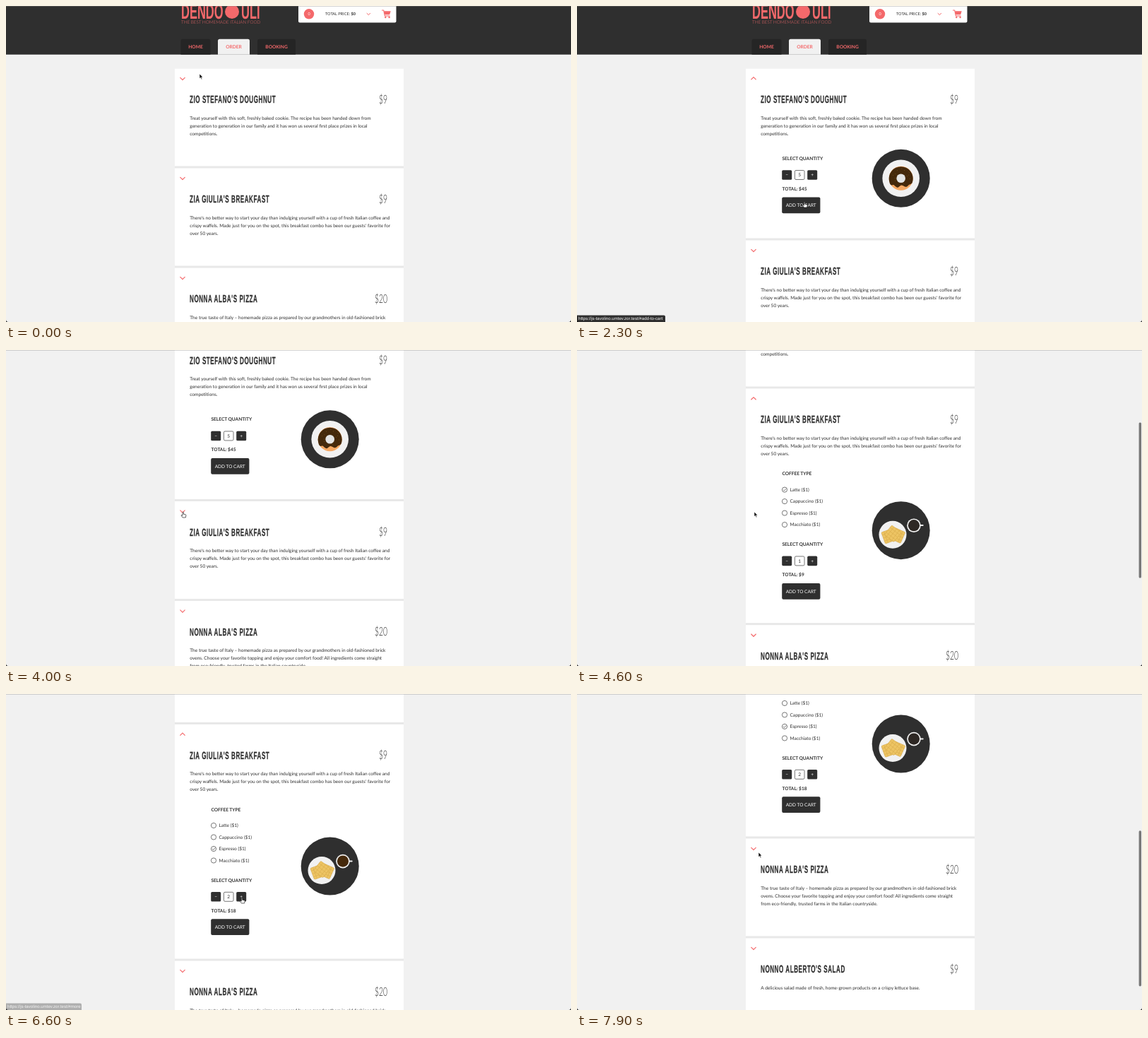
An HTML page that plays this animation: 800 px wide and 447 px high, repeating every 8000 ms.

```html
<!DOCTYPE html>
<html lang="en">
<head>
<meta charset="utf-8">
<title>Order page</title>
<style>
  html, body { margin: 0; width: 100%; height: 100%; overflow: hidden; background: #f1f1f1; }
  svg { display: block; width: 100vw; height: 100vh; }
  text { font: 6.55px Lato, sans-serif; fill: #2f2f2f; text-rendering: geometricPrecision; white-space: pre; }
  .b { font-weight: 700; }
  .title { font: 700 14.7px "Liberation Sans", sans-serif; letter-spacing: 1px; stroke: #2f2f2f; stroke-width: .3; }
  .price { font: 300 17px Lato, sans-serif; }
  .logo { font: 700 30px "Liberation Sans", sans-serif; fill: #f4696b; }
  .tag { font-size: 6.34px; font-weight: 300; fill: #f4696b; }
  .nav { font-size: 6.6px; font-weight: 700; fill: #f4696b; }
  .cart { font-size: 5.6px; }
  .url { font: 6.08px "Liberation Sans", sans-serif; fill: #fff; }
  .mid { text-anchor: middle; }
  .w { fill: #fff; }
  .line { fill: none; stroke: #f4696b; stroke-width: 1.2; stroke-linecap: round; stroke-linejoin: round; }
  .thin { fill: none; stroke: #2f2f2f; stroke-width: .65; }
</style>
</head>
<body>
<svg id="stage" viewBox="0 0 800 447" preserveAspectRatio="none"></svg>
<script>
const LOOP = 8000, DARK = '#2f2f2f', CORAL = '#f4696b', PALE = '#f1f1f1', TAB = '#252525';
const CARD = { top: 88.5, height: 138, gap: 3 };
const EXTRA = [102, 193.5];
const PAGE = { height: 714, offset: 33, view: 447 };
const SITE = 'https:\/\/js-tavolino.umtev.zor.test/#';

const dishes = [
  ["ZIO STEFANO'S DOUGHNUT", '$9', [
    'Treat yourself with this soft, freshly baked cookie. The recipe has been handed down from',
    'generation to generation in our family and it has won us several first place prizes in local',
    'competitions.']],
  ["ZIA GIULIA'S BREAKFAST", '$9', [
    "There's no better way to start your day than indulging yourself with a cup of fresh Italian coffee and",
    "crispy waffels. Made just for you on the spot, this breakfast combo has been our guests' favorite for",
    'over 50 years.']],
  ["NONNA ALBA'S PIZZA", '$20', [
    'The true taste of Italy – homemade pizza as prepared by our grandmothers in old-fashioned brick',
    'ovens. Choose your favorite topping and enjoy your comfort food! All ingredients come straight',
    'from eco-friendly, trusted farms in the Italian countryside.']],
  ["NONNO ALBERTO'S SALAD", '$9', [
    'A delicious salad made of fresh, home-grown products on a crispy lettuce base.']]
];
const coffees = ['Latte', 'Cappuccino', 'Espresso', 'Macchiato'];

// Markup helpers
const text = (x, y, s, cls = '', more = '') => `<text x="${x}" y="${y}" class="${cls}" ${more}>${s}</text>`;
const narrow = (x, y, k, s, cls, more = '') =>
  `<text transform="translate(${x} ${y}) scale(${k} 1)" class="${cls}" ${more}>${s}</text>`;
const rect = (x, y, w, h, fill, r = 0, more = '') =>
  `<rect x="${x}" y="${y}" width="${w}" height="${h}" rx="${r}" fill="${fill}" ${more}/>`;
const circle = (x, y, r, fill, more = '') => `<circle cx="${x}" cy="${y}" r="${r}" fill="${fill}" ${more}/>`;
const path = (d, cls = '', more = '') => `<path d="${d}" class="${cls}" ${more}/>`;

function header() {
  const tab = (x, w, s, fill) => rect(x, 46.8, w, 25, fill, 2.5) + text(x + w / 2, 60, s, 'nav mid');
  return rect(0, -60, 800, 128.7, DARK)
    + narrow(248, 18, .55, 'DENDO', 'logo') + circle(320, 8, 10, CORAL) + narrow(333, 18, .55, 'ULI', 'logo')
    + text(248, 24.8, 'THE BEST HOMEMADE ITALIAN FOOD', 'tag')
    + '<svg x="0" y="0" width="800" height="68.7">'
    + tab(247.5, 42, 'HOME', TAB) + tab(300, 45, 'ORDER', PALE) + tab(356, 54, 'BOOKING', TAB)
    + '</svg>'
    + rect(414, -20, 138.5, 43.5, '#fff', 2)
    + circle(429, 11.3, 7.2, CORAL) + text(429, 13.3, '0', 'cart mid w')
    + text(452, 13.2, 'TOTAL PRICE: <tspan class="b">$0</tspan>', 'cart')
    + path('M511 10.4l2.3 2.2 2.3-2.2', 'line', 'style="stroke-width:1"')
    + path('M532.5 6h2.2l1.7 8h6.8', 'line')
    + path('M535.3 7.2h9.4l-1.5 5h-6.8z', '', `fill="${CORAL}"`)
    + circle(537.3, 16, 1.2, CORAL) + circle(542.6, 16, 1.2, CORAL);
}

function form(y, id) {
  const key = (x, s) => rect(x, y + 16.7, 14, 13.6, DARK, 1.6) + text(x + 7, y + 25.7, s, 'mid w');
  return text(290.5, y + 2.4, 'SELECT QUANTITY', 'b')
    + key(290.2, '−') + key(326.2, '+')
    + rect(308.4, y + 17, 13.6, 13, '#fff', 1.6, `stroke="${DARK}" stroke-width=".65"`)
    + text(315.2, y + 25.9, '1', 'mid', `id="qty${id}"`)
    + text(290.5, y + 45.2, 'TOTAL: $9', 'b', `id="sum${id}"`)
    + rect(290.2, y + 55, 54.2, 22.8, DARK, 2) + text(317.2, y + 68.7, 'ADD TO CART', 'mid w');
}

function doughnut() {
  const dots = Array.from({ length: 14 }, (_, i) => {
    const a = i * 2.4, r = 9 + i % 3 * 2.3;
    return circle((r * Math.cos(a)).toFixed(1), (-3 + r * .8 * Math.sin(a)).toFixed(1), .5, '#7a5520');
  }).join('');
  return '<g transform="translate(458.7 155.3)">'
    + circle(0, 0, 41, DARK) + circle(0, 0, 26.3, PALE) + circle(0, 0, 17, '#f5a863')
    + path('M-16.6 4A17 17 0 1 1 16.6 4C16 9 12.5 8 11 9.5S8 13 5 11.5 1 9 -1 10.5 -4 14 -7 12 -9.5 8.5 -12 9.5 -16 8 -16.6 4Z', 'cocoa')
    + dots + circle(0, 0, 6.3, '#e4e4e4') + '</g>';
}

function breakfast() {
  const grid = [-4.5, 0, 4.5].map(v => `M${v} -8.5v17M-8.5 ${v}h17`).join('');
  const waffle = (x, y, a) => `<g transform="translate(${x} ${y}) rotate(${a})">`
    + rect(-8.5, -8.5, 17, 17, '#edc463', 1.5, 'stroke="#d3a544" stroke-width=".5"')
    + path(grid, '', 'stroke="#d9ad4d" stroke-width=".6"') + '</g>';
  return '<g transform="translate(458.7 200.6)">'
    + circle(0, 0, 41, DARK) + circle(-11.7, 6, 19.5, PALE)
    + waffle(-17, 8, -20) + waffle(-5, 7, 24) + waffle(-11.5, 4.5, 38)
    + rect(26, -8.1, 6, 2, PALE, 1) + circle(18.3, -7, 9.8, PALE)
    + '<circle cx="18.3" cy="-7" r="8.1" class="cocoa"/></g>';
}

function coffeeList() {
  return text(290.5, 122.9, 'COFFEE TYPE', 'b') + coffees.map((name, i) => {
    const y = 143 + i * 16.5;
    return `<circle cx="294" cy="${y}" r="3.6" class="thin"/>`
      + path(`M292 ${y}l1.5 1.5 2.8-3`, 'thin tick') + text(301.5, y + 2.3, name + ' ($1)');
  }).join('');
}

function card([title, price, lines], i) {
  const more = [
    () => form(127, 0) + doughnut(),
    () => coffeeList() + form(220.3, 1) + breakfast()
  ][i];
  return `<g class="card">${rect(239, 0, 324, CARD.height + 3, '#e8e8e8', 0, 'class="edge"')}`
    + rect(239, 0, 324, CARD.height, '#fff', 0, 'class="face"')
    + path('', 'line arrow')
    + narrow(260, 48.8, .55, title, 'title')
    + narrow(540, 49.3, .61, price, 'price', 'text-anchor="end"')
    + lines.map((s, n) => text(260.3, 72.2 + n * 11, s)).join('')
    + (more ? `<g class="more">${more()}</g>` : '') + '</g>';
}

const stage = document.getElementById('stage');
stage.innerHTML = rect(0, 0, 800, 447, PALE)
  + `<g id="page">${header()}${dishes.map(card).join('')}</g>`
  + rect(795.6, 0, 3.4, 100, '#777', 1.7, 'id="thumb"')
  + `<g id="status">${path('', '', `id="plate" fill="${DARK}"`)}${text(2, 444.4, '', 'url', 'id="url"')}</g>`
  + rect(0, 0, 800, 1, '#888', 0, 'opacity=".35"')
  + path('M0 443.5A3.5 3.5 0 0 0 3.5 447H0ZM800 443.5A3.5 3.5 0 0 1 796.5 447H800Z', '', 'fill="#111"')
  + '<g id="cursor" stroke-width=".6" stroke-linejoin="round">'
  + path('M0 0V6.6L1.6 5.2 2.7 7.7 3.8 7.2 2.7 4.8H4.8Z', '', 'id="pointer" fill="#000" stroke="#fff"')
  + path('M-.7 .6Q0-.4.7.6V3.2L3.4 3.7Q4.3 4 4.2 5L3.6 8H-.6L-2.6 5.2Q-2.6 4.2-1.6 4.6L-.7 5.3Z', '', 'id="hand" fill="#fff" stroke="#000"')
  + '</g>';

const get = id => document.getElementById(id);
const all = sel => [...stage.querySelectorAll(sel)];
const cards = all('.card'), ticks = all('.tick'), cocoa = all('.cocoa');

// Timeline: [time, values...]
const scrollKeys = [[2700, 0], [2900, 45], [3000, 78], [3100, 101], [3400, 117.5], [4150, 117.5],
  [4450, 162], [4600, 174.8], [4720, 186.5], [7250, 186.5], [7500, 275], [7700, 335], [7880, 359.5]];
const cursorKeys = [[100, 274, 96], [400, 250, 101], [620, 250, 101], [900, 333, 238], [2080, 333, 238],
  [2260, 322, 277], [2400, 322, 277], [2700, 241, 297], [3450, 241, 297], [3850, 250.7, 229],
  [4800, 251, 229], [5300, 295, 217], [5700, 295, 217], [6100, 318, 318], [6350, 334, 288],
  [6800, 334, 288], [7100, 262, 300], [7300, 257, 224]];
const barKeys = [[2700, 0], [2750, 1], [3500, 1], [3800, 0], [4120, 0], [4170, 1], [5000, 1], [5300, 0], [7250, 0], [7300, 1]];
const statusKeys = [[1000, 0], [1150, 1], [2450, 1], [2600, 0], [6550, 0], [6700, 1], [6950, 1], [7100, 0]];
const handSpans = [[350, 650], [860, 2440], [3780, 4080], [6330, 6850]];
const smooth = k => k * k * (3 - 2 * k);

function at(keys, t, ease = k => k) {
  const n = keys.findIndex(k => k[0] > t);
  if (n === 0) return keys[0].slice(1);
  if (n < 0) return keys[keys.length - 1].slice(1);
  const a = keys[n - 1], b = keys[n], k = ease((t - a[0]) / (b[0] - a[0]));
  return a.slice(1).map((v, i) => v + (b[i + 1] - v) * k);
}
const count = (times, t) => 1 + times.filter(x => t >= x).length;
const set = (el, attrs) => { for (const k in attrs) el.setAttribute(k, attrs[k]); };
const show = (el, on) => { el.style.display = on ? '' : 'none'; };

function draw(t) {
  const [scroll] = at(scrollKeys, t);
  const open = t < 500 ? -1 : t < 4080 ? 0 : 1;

  let y = CARD.top;
  cards.forEach((el, i) => {
    const h = CARD.height + (i === open ? EXTRA[i] : 0);
    set(el, { transform: `translate(0 ${y})` });
    set(el.querySelector('.face'), { height: h });
    set(el.querySelector('.edge'), { height: h + CARD.gap });
    set(el.querySelector('.arrow'), { d: i === open ? 'M246.8 15.4l3.2-3.2 3.2 3.2' : 'M246.8 12.9l3.2 3.2 3.2-3.2' });
    const more = el.querySelector('.more');
    if (more) show(more, i === open);
    y += h + CARD.gap;
  });
  set(get('page'), { transform: `translate(0 ${-scroll})` });

  [count([1000, 1250, 1500, 1800], t), count([6450], t)].forEach((n, i) => {
    get('qty' + i).textContent = n;
    get('sum' + i).textContent = 'TOTAL: $' + n * 9;
  });
  const pick = t < 5400 ? 0 : 2;
  ticks.forEach((el, i) => show(el, i === pick));

  const [bar] = at(barKeys, t);
  const ratio = PAGE.view / (PAGE.height + (EXTRA[open] || 0));
  set(get('thumb'), { y: (scroll + PAGE.offset) * ratio, height: PAGE.view * ratio, opacity: bar });
  const moving = bar === 1 && (t < 3500 || t > 4170 && t < 4750 || t > 7250);
  cocoa.forEach(el => set(el, { fill: moving ? '#2e2824' : '#45290b' }));

  const adding = t >= 2200 && t < 3000, w = adding ? 125 : 107;
  get('url').textContent = SITE + (adding ? 'add-to-cart' : 'more');
  set(get('plate'), { d: `M0 437.5H${w - 2}Q${w} 437.5 ${w} 439.5V447H0Z` });
  set(get('status'), { opacity: at(statusKeys, t)[0] });

  const [cx, cy] = at(cursorKeys, t, smooth);
  const hand = handSpans.some(([a, b]) => t >= a && t < b);
  set(get('cursor'), { transform: `translate(${cx} ${cy})` });
  show(get('hand'), hand);
  show(get('pointer'), !hand);
}

function tick() {
  draw(performance.now() % LOOP);
  requestAnimationFrame(tick);
}
tick();
</script>
</body>
</html>
```
